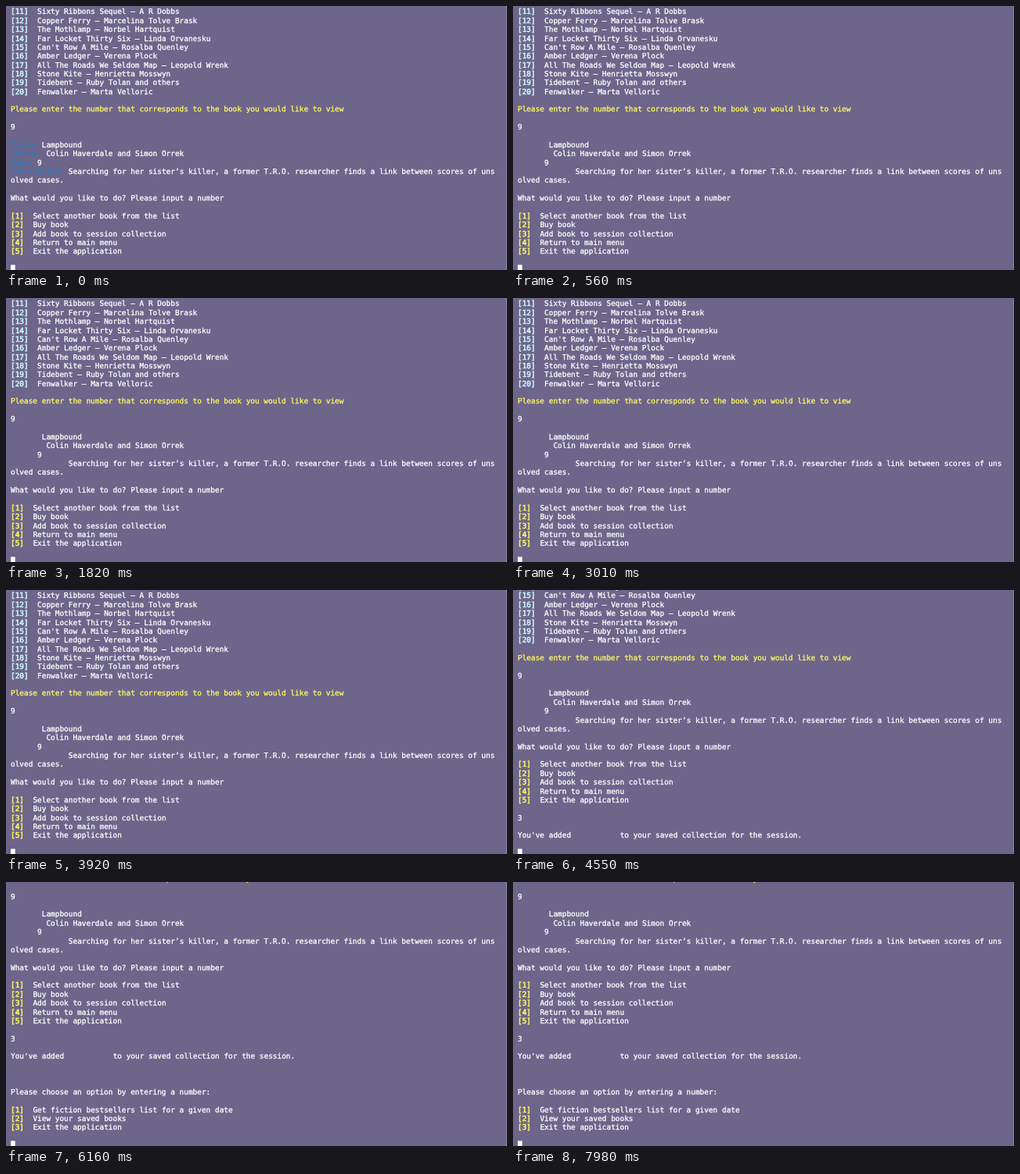
An HTML page that plays this animation: 640 by 338 pixels, repeating every 8 s.

```html
<!DOCTYPE html>
<html lang="en">
<head>
<meta charset="utf-8">
<title>Bestsellers in the terminal</title>
<style>
  html, body { margin: 0; width: 100%; height: 100%; overflow: hidden; background: #6d658a; }
  svg { display: block; width: 640px; height: 338px; }
  text {
    font: 9.435px "DejaVu Sans Mono", Menlo, monospace;
    text-rendering: geometricPrecision;
    white-space: pre;
    fill: currentColor;
    stroke: currentColor;
    stroke-width: .3px;
    color: #fff;
  }
  .cyan { color: #cdf8fa; }
  .yellow { color: #fdfa62; }
  .tag { stroke-width: .55px; }
  .blue { color: #3279b8; }
</style>
</head>
<body>
<svg id="stage" viewBox="0 0 640 338">
  <g id="page"></g>
  <rect id="cursor" width="5.7" height="11.4" fill="#fff"/>
  <path d="M639.5 0V338" stroke="#fff" stroke-opacity=".18"/>
</svg>
<script>
const LOOP = 8000, LEFT = 6, COL = 5.68, ROW = 11.37, BASE = 10.4;
const page = document.getElementById('page');
const cursor = document.getElementById('cursor');
const lines = [], labels = [];

function put(row, col, str, cls = '') {
  const el = document.createElementNS('http://www.w3.org/2000/svg', 'text');
  el.setAttribute('x', LEFT + col * COL);
  el.setAttribute('y', BASE + row * ROW);
  el.setAttribute('class', cls);
  el.textContent = str;
  page.append(el);
  lines.push({ el, row });
  return el;
}

function list(row, first, cls, items) {
  items.forEach((item, i) => {
    const tag = `[${first + i}]`;
    put(row + i, 0, tag, `${cls} tag`);
    put(row + i, tag.length + 2, item);
  });
}

function field(row, label, value) {
  labels.push(put(row, 0, label, 'blue'));
  put(row, label.length + 1, value);
}

list(0, 11, 'cyan', [
  'Sixty Ribbons Sequel – A R Dobbs',
  'Copper Ferry – Marcelina Tolve Brask',
  'The Mothlamp – Norbel Hartquist',
  'Far Locket Thirty Six – Linda Orvanesku',
  "Can't Row A Mile – Rosalba Quenley",
  'Amber Ledger – Verena Plock',
  'All The Roads We Seldom Map – Leopold Wrenk',
  'Stone Kite – Henrietta Mosswyn',
  'Tidebent – Ruby Tolan and others',
  'Fenwalker – Marta Velloric'
]);
put(11, 0, 'Please enter the number that corresponds to the book you would like to view', 'yellow');
put(13, 0, '9');

field(15, 'Title:', 'Lampbound');
field(16, 'Author:', 'Colin Haverdale and Simon Orrek');
field(17, 'Rank:', '9');
field(18, 'Description:', 'Searching for her sister’s killer, a former T.R.O. researcher finds a link between scores of uns');
put(19, 0, 'olved cases.');

put(21, 0, 'What would you like to do? Please input a number');
list(23, 1, 'yellow', [
  'Select another book from the list',
  'Buy book',
  'Add book to session collection',
  'Return to main menu',
  'Exit the application'
]);

put(29, 0, '3');
put(31, 0, "You've added");
put(31, 23, 'to your saved collection for the session.');
put(35, 0, 'Please choose an option by entering a number:');
list(37, 1, 'yellow', [
  'Get fiction bestsellers list for a given date',
  'View your saved books',
  'Exit the application'
]);

// at: start in ms, top: rows scrolled away, last: last printed row, col: cursor column
const steps = [
  { at: 0, top: 0, last: 27, col: 0 },
  { at: 4130, top: 0, last: 29, col: 1 },
  { at: 4480, top: 4, last: 31, col: 0 },
  { at: 5600, top: 12, last: 39, col: 0 }
];
const LABELS_END = 70;

function draw(t) {
  const step = steps.filter(s => s.at <= t).pop();
  page.setAttribute('transform', `translate(0 ${-step.top * ROW})`);
  for (const { el, row } of lines) el.style.display = row <= step.last ? '' : 'none';
  if (t >= LABELS_END) for (const el of labels) el.style.display = 'none';
  cursor.setAttribute('x', LEFT + step.col * COL);
  cursor.setAttribute('y', BASE + 29 * ROW - 8.7);
}

const start = performance.now();
function tick() {
  draw((performance.now() - start) % LOOP);
  requestAnimationFrame(tick);
}
draw(0);
requestAnimationFrame(tick);
</script>
</body>
</html>
```
